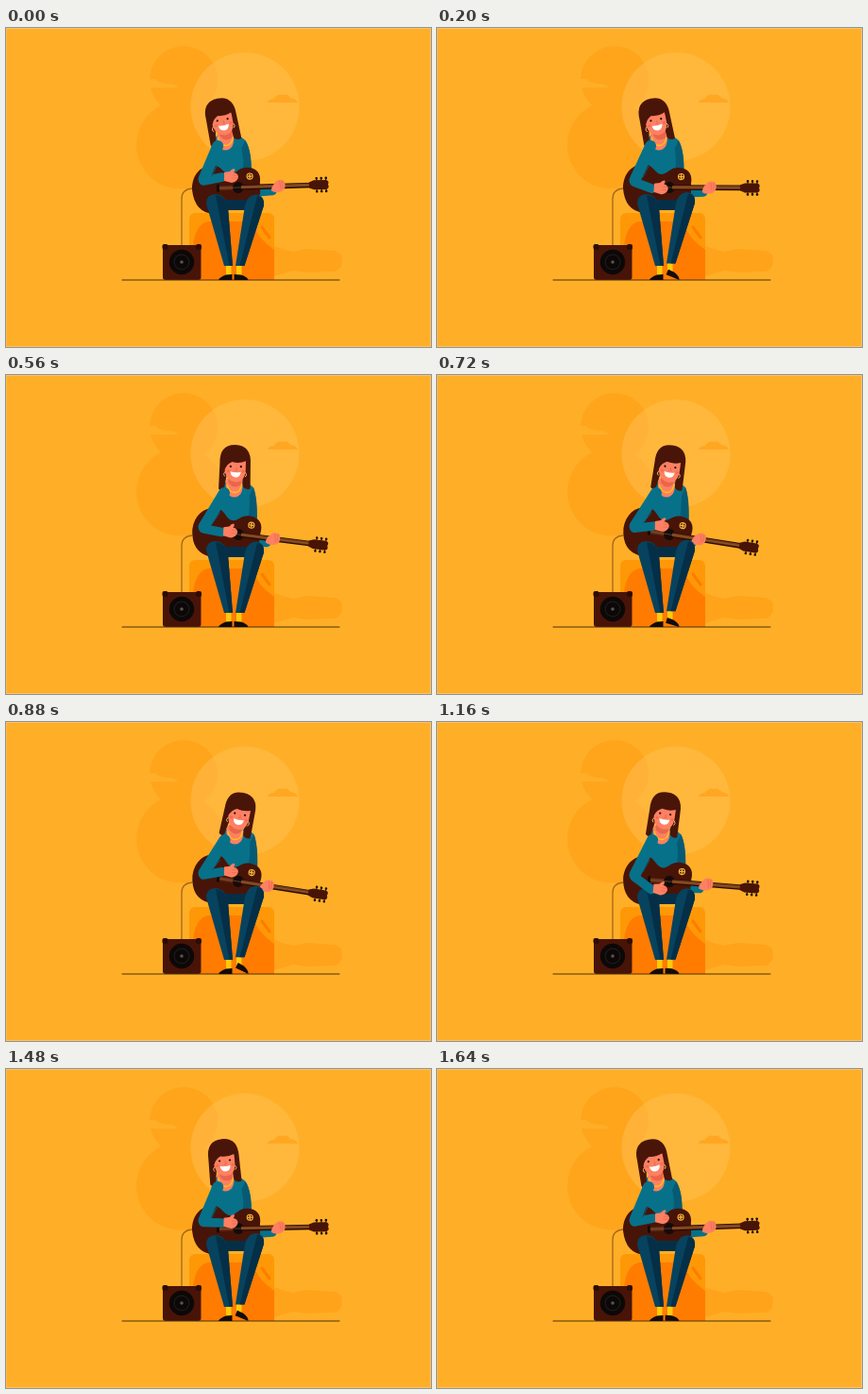
These frames come from a looping animation (450x338 px, 1680 ms). An HTML page with a canvas:

```html
<!DOCTYPE html>
<html lang="en">
<head>
<meta charset="utf-8">
<title>Guitar player</title>
<style>
html, body { margin: 0; width: 100%; height: 100%; overflow: hidden; background: #ffaf27; }
canvas { display: block; width: 450px; height: 338px; }
</style>
</head>
<body>
<canvas id="stage" width="450" height="338"></canvas>
<script>
const ctx = document.getElementById('stage').getContext('2d');
const LOOP = 1680, STEP = 40, TAU = Math.PI * 2, DEG = Math.PI / 180;
const C = {
  sky: '#ffaf27', edge: '#f8c268', blob: '#ffa51c', sun: '#ffb73f', cloud: '#ffa722',
  box: '#ff9806', boxDark: '#ff7c00', boxNeck: '#ffa31b',
  hair: '#4a1509', skin: '#fd8062', skinDark: '#ea6549',
  teal: '#07718a', tealDark: '#075a74', navy: '#07435e', navyDark: '#042f47',
  wood: '#481407', woodDark: '#2d0c05', fret: '#79401a', black: '#140b0a', yellow: '#ffc90c'
};

function disc(x, y, rx, color, ry = rx) {
  ctx.fillStyle = color;
  ctx.beginPath();
  ctx.ellipse(x, y, rx, ry, 0, 0, TAU);
  ctx.fill();
}
function shape(d, color) {
  ctx.fillStyle = color;
  ctx.fill(new Path2D(d));
}
function line(d, color, width) {
  ctx.strokeStyle = color;
  ctx.lineWidth = width;
  ctx.lineCap = ctx.lineJoin = 'round';
  ctx.stroke(new Path2D(d));
}
function block(x, y, w, h, r, color) {
  ctx.fillStyle = color;
  ctx.beginPath();
  ctx.roundRect(x, y, w, h, r);
  ctx.fill();
}
function placed(x, y, angle, draw) {
  ctx.save();
  ctx.translate(x, y);
  ctx.rotate(angle);
  draw();
  ctx.restore();
}
const ease = u => (1 - Math.cos(Math.PI * u)) / 2;
// Swings from -1 to 1 and back once per loop, running ahead by lead ms
const swing = (t, lead) => -Math.cos(TAU * (t + lead) / LOOP);

// Eased interpolation through [time, value] pairs
function keyed(t, keys) {
  const i = keys.findIndex(k => k[0] > t);
  const [t0, a] = keys[i - 1], [t1, b] = keys[i];
  return a + (b - a) * ease((t - t0) / (t1 - t0));
}
const fretKeys = [[0, 43], [330, 43], [830, 31], [1340, 43], [1681, 43]];

// 0 above the strings, 1 at the end of the down stroke; two strokes per loop
function strum(t) {
  const u = t % 840;
  if (u < 350) return ease(u / 350);
  return Math.pow(Math.max(0, 1 - (u - 350) / 470), 1.45);
}

function drawBackground() {
  ctx.fillStyle = C.sky;
  ctx.fillRect(0, 0, 450, 338);
  ctx.strokeStyle = C.edge;
  ctx.lineWidth = 1;
  ctx.strokeRect(0.5, 0.5, 449, 337);

  disc(188, 55, 36, C.blob);
  disc(184.5, 124, 46.5, C.blob);
  shape('M151 63 V54 H158 Q161 58 166 58 Q169 60 174 59 Q180 60 182 63Z', C.sky);
  ctx.globalAlpha = 0.5;
  disc(253, 83.5, 57.5, '#ffc052');
  ctx.globalAlpha = 1;
  shape('M277 79 Q278 75 284 75 Q287 69 293 71 Q298 69 301 74 Q308 75 309 79Z', C.cloud);

  shape('M284 231 Q294 235 304 237 L318 234 L348 236 Q356 238 356 246 Q356 256 348 258 L318 259 L304 257 Q294 260 284 263Z', C.boxNeck);
  block(194, 196, 90, 71, 6, C.box);
  shape('M199 267 Q196 250 198 232 Q200 208 214 205 H260 Q267 224 284 235 V267Z', C.boxDark);
  line('M271 211 L279 222', C.boxDark, 3);
}

function drawAmp() {
  line('M186 230 V181 Q186 171 197 170', '#a8661a', 1.3);
  block(166, 230, 40.5, 37, 3, C.wood);
  block(165.5, 229, 6, 6, 2, C.woodDark);
  block(201, 229, 6, 6, 2, C.woodDark);
  disc(186, 248, 13.2, '#0d0808');
  disc(186, 248, 8.5, '#1f1b1b');
  disc(186, 248, 7.3, '#0d0808');
  disc(186, 248, 1.8, '#5a5452');
  line('M123 267 H353', '#4c300c', 1);
}

function drawLegs(tap) {
  const up = 3 * tap;
  shape('M218 182 H262 V193 H218Z', C.navyDark);

  block(233, 249, 5.5, 13, 1, C.yellow);
  shape('M239.5 261 V267 H225 Q226 264 233 261.5Z', C.black);
  shape('M212 186 Q212 176 222 176 Q233 177 235 190 L240 252 H231Z', C.navy);
  shape('M222 177 Q233 178 235 190 L240 252 H236.5Z', C.navyDark);

  block(244, 249 - up, 5.5, 13, 1, C.yellow);
  placed(256.5, 267, 0.48 * tap, () =>
    shape('M-15 -6 L-8 -5.5 Q-1 -3.5 0 0 H-15Z', C.black));
  placed(0, -up, 0, () => {
    shape('M253 188 Q256 177 264 176.5 Q274 177 273 188 L252.5 252 H243Z', C.navy);
    shape('M266 178 Q274 179 273 188 L252.5 252 H247.5Z', C.navyDark);
  });
}

function drawTorso(lean) {
  const a = 5 * lean, b = 3.5 * lean;
  shape(`M${230 + a} 113 Q${224 + a} 116 ${222 + a} 126 L213 162 L216 186 H260 L${263 + b} 154 Q${263 + b} 128 ${258 + a} 119 Q${253 + a} 114 ${245 + a} 113Z`, C.teal);
  shape(`M${254 + a} 128 Q${256 + b} 142 ${253 + b} 156 H${263 + b} Q${264 + b} 130 ${258 + a} 119Z`, C.tealDark);
  placed(237.5 + 5.5 * lean, 118, 0, () => {
    shape('M-8 -8 H8 L9 -2 Q9 11 0 11.5 Q-9 11 -9 -2Z', C.skin);
    shape('M-6 -9 H7 V-2 Q0 4 -6 -4Z', C.skinDark);
    line('M-7.5 -2 Q-6 6.5 0.5 6.5 Q6.5 6.5 8 -2', C.yellow, 1.3);
  });
}

function drawHead(lean, nod) {
  placed(237.5 + 5.5 * lean, 118, 12 * DEG * nod, () => {
    shape('M-16 -24 Q-17 -44 0 -44 Q17 -44 16.5 -24 L17 2 Q12 4 9 0 L8 -14 H-8 L-11 4 Q-14 6 -16.5 3Z', C.hair);
    shape('M-10.5 -29 H11.5 V-16 Q10.5 -4.5 1 -4.5 Q-8.5 -5.5 -10.5 -16Z', C.skin);
    shape('M-13 -19 L-13 -35 Q0 -42 14 -34 V-20 Q12 -22 11.5 -27 Q4 -24 -3 -26 Q-8 -24 -10.5 -18Z', C.hair);
    disc(-4.5, -21, 1.1, C.black);
    disc(6.5, -21, 1.1, C.black);
    line('M1.5 -20 L2.5 -17 H0.5', C.skinDark, 0.8);
    disc(-7, -16, 1.8, '#f26d52', 1.5);
    disc(9, -16, 1.6, '#f26d52', 1.5);
    shape('M-4.5 -15.5 Q1 -14 6.5 -15.5 Q6 -9.5 1 -9.5 Q-4 -9.8 -4.5 -15.5Z', '#fff');
    line('M-10.5 -15 Q-13 -12 -10.5 -10.5 M11.5 -15 Q14 -12 11.5 -10.5', '#ffc06a', 0.9);
  });
}

function drawGuitar(angle, fret) {
  placed(246, 169, angle, () => {
    line(`M14 6 L${fret - 7} 5`, C.teal, 9);
    shape('M-49 1 C-49 -16 -38 -25 -26 -25 C-17 -24 -15 -14 -8 -14 C-2 -14 0 -21 9 -21 C20 -21 25 -14 23 -4 L23 5 Q22 18 8 18 Q-3 17 -9 22 Q-17 28 -27 27 Q-47 25 -49 1Z', C.wood);
    block(-22, -2.2, 20, 4.4, 0.5, '#653018');
    disc(0, 0, 6, C.black);
    block(-23, -4, 3, 8, 1, C.black);
    disc(12.5, -11.5, 3.6, '#f8b838');
    disc(12.5, -11.5, 2.5, C.wood);
    line('M10.5 -11.5 H14.5 M12.5 -13.5 V-9.5', '#f8b838', 1.3);
    block(3, -2.8, 75, 5.6, 0.5, C.woodDark);
    block(3, -2, 75, 3.4, 0.5, C.fret);
    line('M-20 0 H82', '#a5653a', 0.5);
    shape('M75 -3 L80 -5 H93 Q97 -4 95 0 Q97 4 93 5 H80 L75 3Z', C.wood);
    for (let x = 83; x <= 93; x += 5) {
      line(`M${x} -5 V-7 M${x} 5 V7`, C.black, 1);
      disc(x, -7, 1.3, C.black);
      disc(x, 7, 1.3, C.black);
    }
    placed(fret, -1, 0, () => {
      shape('M-8 3 Q-6 -2 -2 -5 Q3 -7 6 -4 Q8 3 4 6 Q-2 9 -8 6Z', C.skin);
      line('M1 -4 L2 4 M4 -4 V3', C.skinDark, 0.7);
    });
  });
}

function drawStrumArm(lean, low) {
  const x = 239 - 2 * low, y = 157 + 20 * low, elbowY = 162 + 2 * low;
  line(`M${228 + 4 * lean} 125 L209.5 ${elbowY - 2}`, C.teal, 12);
  line(`M209 ${elbowY} L${x - 10} ${y + 1}`, C.teal, 9.5);
  line(`M${225 + 2 * lean} 146 L218 ${elbowY - 5}`, C.tealDark, 1);
  placed(x, y, 0.1 * low, () => {
    shape('M-8 -4 L-2 -5 Q0 -8 3 -8 Q4 -6 2 -4 Q7 -3 7 1 Q6 6 0 7 L-8 5Z', C.skin);
    line('M1 -1 H6 M1 2 H5', C.skinDark, 0.7);
  });
}

function draw(t) {
  // the torso leads the sway, the guitar follows it and the head comes last
  const lean = swing(t, 90), nod = swing(t, -100);
  const tilt = (3.6 + 5.6 * swing(t, 50)) * DEG;
  const tap = (1 - Math.cos(3 * TAU * t / LOOP)) / 2;
  drawBackground();
  drawAmp();
  drawTorso(lean);
  drawHead(lean, nod);
  drawGuitar(tilt, keyed(t, fretKeys));
  drawLegs(tap);
  drawStrumArm(lean, strum(t));
}

function tick() {
  draw(Math.floor(performance.now() % LOOP / STEP) * STEP);
  requestAnimationFrame(tick);
}
tick();
</script>
</body>
</html>
```
